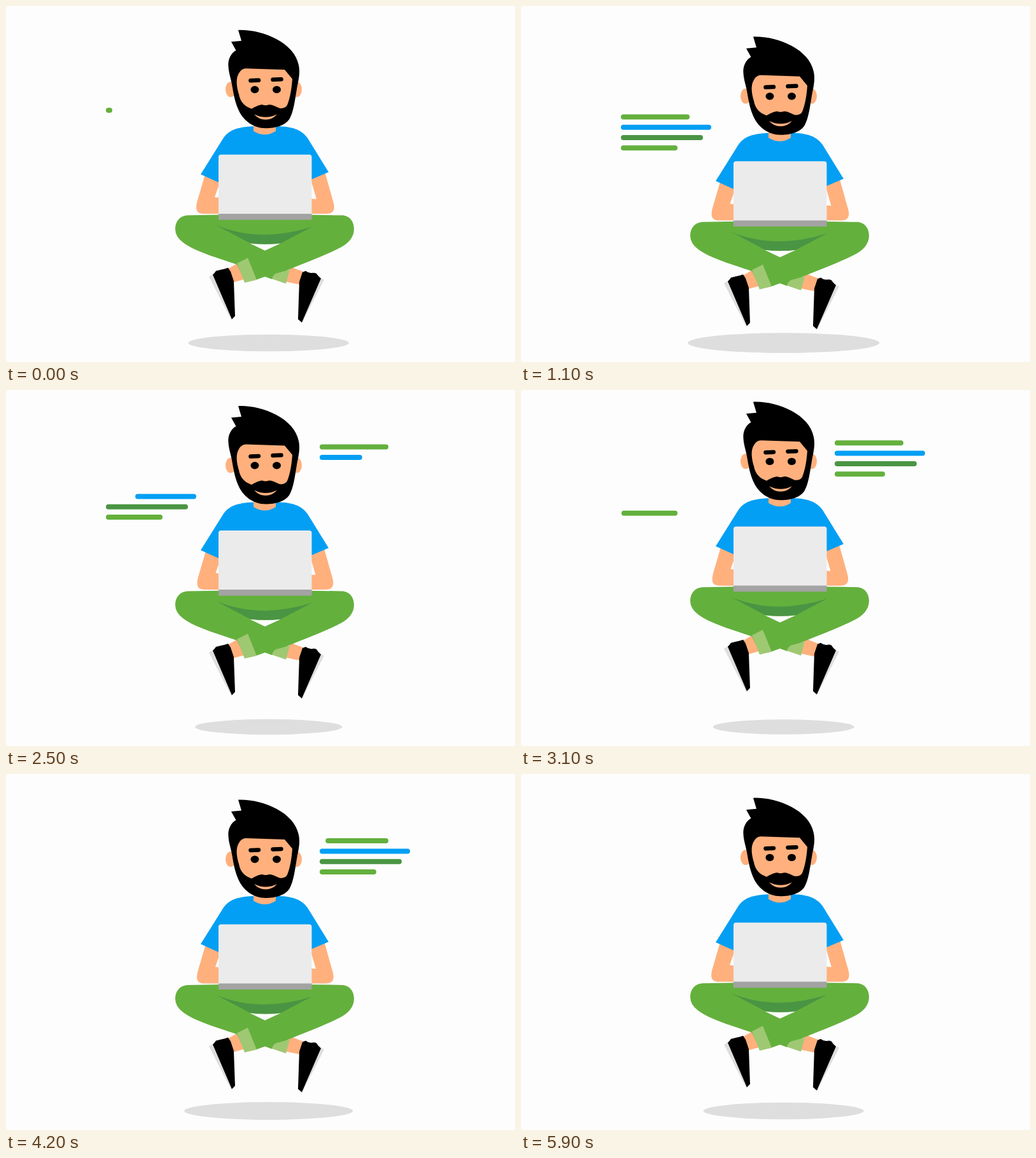
Animation of 800 by 560 pixels, one loop 6000 ms. Source, as an HTML page:

```html
<!DOCTYPE html>
<html lang="en">
<head>
<meta charset="utf-8">
<title>Floating coder</title>
<style>
html, body { margin: 0; width: 100%; height: 100%; overflow: hidden; background: #fdfdfd; }
svg { display: block; width: 800px; height: 560px; }
</style>
</head>
<body>
<svg viewBox="0 0 800 560">
  <ellipse id="shadow" cx="412.7" cy="530" fill="#dedede"/>
  <g id="body">
    <g id="lines" stroke-width="8" stroke-linecap="round"></g>

    <g fill="#ffb07d">
      <path d="M348 413L364 404L375 429L357 434Z"/>
      <path d="M446 409L469 418L464 438L440 433Z"/>
    </g>
    <path fill="#dedede" d="M319 425L327 420L358 490L354 493Z M493 426L500 430L465 498L461 495Z"/>
    <path d="M325 422Q328 419 330 416Q334 415 338 414Q344 413 349 411L353 417L358 432L360 487L355 492Z"/>
    <path d="M461 433L466 418L471 416Q476 420 482 419Q488 418 490 423L495 428L465 497L459 492Z"/>

    <path fill="#64b03d" d="M285 328.500Q407 326 530 328.500C541 330 547 339 547 350C547 364 537 374 522 381C496 394 470 403 444 414L418 429L407 425L393 430L376 433L363 406C335 396 295 385 278 371Q266 362 266 350C266 338 273 329.500 285 328.500Z"/>
    <path fill="#fdfdfd" d="M383 372.500Q408 375.500 432 372.500L407 384Z"/>
    <path fill="#4a9543" d="M330 344Q366 359 408 359Q446 358 481 346.500L432 372.500Q408 375 384 372.500Z"/>
    <path fill="#9fc873" d="M363 404L380 395.500L394 430L375 434.500Z M418 428.500Q419 423 424 420L446 414L440 436Z"/>

    <g fill="#ffb07d">
      <path id="armL" d="M313 264L301 305C297 319 299 326 311 326H340V301L328 300L336 277Z"/>
      <path id="armR" d="M501 260L514 306C518 319 515 326 504 326H474V302L488 303L479 272Z"/>
    </g>
    <path fill="#039ff4" d="M389 188.500C364 189.500 350 194 341 208L306 264L337 278H479L480 272L507 260.500L474 207C465 194 450 188.500 425 188.500Z"/>
    <path fill="#ffb07d" d="M389 180V196Q407 207 424 196V180Z"/>

    <ellipse cx="353" cy="130.500" rx="8" ry="12" fill="#ffb07d"/>
    <ellipse cx="457" cy="130.500" rx="8" ry="12" fill="#ffb07d"/>
    <path d="M365 37C402 35.500 453 56 460 92C463 106 459 118 457 130C454 148 452 165 446 176C440 187 424 191.500 408 191.500C388 191.500 374 179 367 166C360 152 358 139 356 128C354 114 350 105 349.500 94C348.500 83 354 73 361.500 69L354 55.500L370 54Z"/>
    <path fill="#ffb07d" d="M377 97.500L438 99.500L450 114C449 130 446 146 442 155Q439 161 430 160C423 157 418 154 413 154.500Q408 156.500 403 154.500C398 154.500 393 157 386 161C375 157 368 150 366 138C362 125 361 113 366 105Q370 97.500 377 97.500Z"/>
    <path fill="#ffb07d" d="M390 169.500Q399 174 408 174Q417 174 426 169.500Q419 178 408 178Q397 178 390 169.500Z"/>
    <path stroke="#000" stroke-width="6.500" stroke-linecap="round" d="M384.500 116.500L397 116M419.500 115L432.500 114.500"/>
    <ellipse class="eye" cx="391" cy="130.700" rx="6.500"/>
    <ellipse class="eye" cx="425.500" cy="130.700" rx="6.500"/>

    <path fill="#ebebeb" d="M334 327V237Q334 233 338 233H476.500Q480.500 233 480.500 237V327Z"/>
    <rect x="334" y="326" width="146.500" height="9.500" fill="#a3a3a3"/>
  </g>
</svg>
<script>
const LOOP = 6000, STEP = 100;
const PEAK = 2945, HALF = 2000;   // top of the hover, half its period
const TYPE = 246, ERASE = 360;    // time per text line
const BLINK = 4945;
const $ = id => document.getElementById(id);
const clamp = v => Math.max(0, Math.min(1, v));

const rows = [[108, '#64b03d'], [142, '#039ff4'], [129, '#4a9543'], [89, '#64b03d']];
const blocks = [
  { x: 157, y: 163.1, type: -5, erase: 2016 },
  { x: 493, y: 101.6, type: 2146, erase: 4167 }
];
const bars = blocks.flatMap(b => rows.map(([len, color], i) => {
  const el = document.createElementNS('http://www.w3.org/2000/svg', 'line');
  const y = b.y + i * 16.3;
  el.setAttribute('stroke', color);
  el.setAttribute('y1', y);
  el.setAttribute('y2', y);
  $('lines').append(el);
  return { el, x: b.x + 4, len: len - 8, on: b.type + i * TYPE, off: b.erase + i * ERASE };
}));
const eyes = document.querySelectorAll('.eye');

// Two straight pieces: top to middle, middle to bottom.
const piece = (u, a, b, c) => u < 0.5 ? a + (b - a) * u * 2 : b + (c - b) * (u * 2 - 1);

function hover(t) {
  const d = Math.abs(t - PEAK) / HALF;
  return d > 1 ? 2 - d : d;
}

function draw(t) {
  const u = hover(t);
  const rx = piece(u, 108.5, 124.7, 155.5);
  $('shadow').setAttribute('rx', rx);
  $('shadow').setAttribute('ry', rx * 0.105);
  $('body').setAttribute('transform', `translate(0 ${piece(u, -21.7, 0.1, 13.4)})`);

  const sway = 0.75 * (1 - Math.cos(2 * Math.PI * t / LOOP));
  $('armL').setAttribute('transform', `translate(${sway} 0)`);
  $('armR').setAttribute('transform', `translate(${-sway} 0)`);

  const open = clamp(Math.abs(t - BLINK) / 100);
  for (const e of eyes) e.setAttribute('ry', 0.8 + 4.9 * open);

  for (const b of bars) {
    const end = clamp((t - b.on) / TYPE), start = clamp((t - b.off) / ERASE);
    b.el.setAttribute('visibility', t >= b.on && start < 1 ? 'visible' : 'hidden');
    b.el.setAttribute('x1', b.x + b.len * start);
    b.el.setAttribute('x2', b.x + b.len * end + 0.01);
  }
}

let origin = null;
function tick(now) {
  if (origin === null) origin = now;
  const t = (now - origin) % LOOP;
  draw(Math.floor(t / STEP) * STEP);
  requestAnimationFrame(tick);
}
draw(0);
requestAnimationFrame(tick);
</script>
</body>
</html>
```
